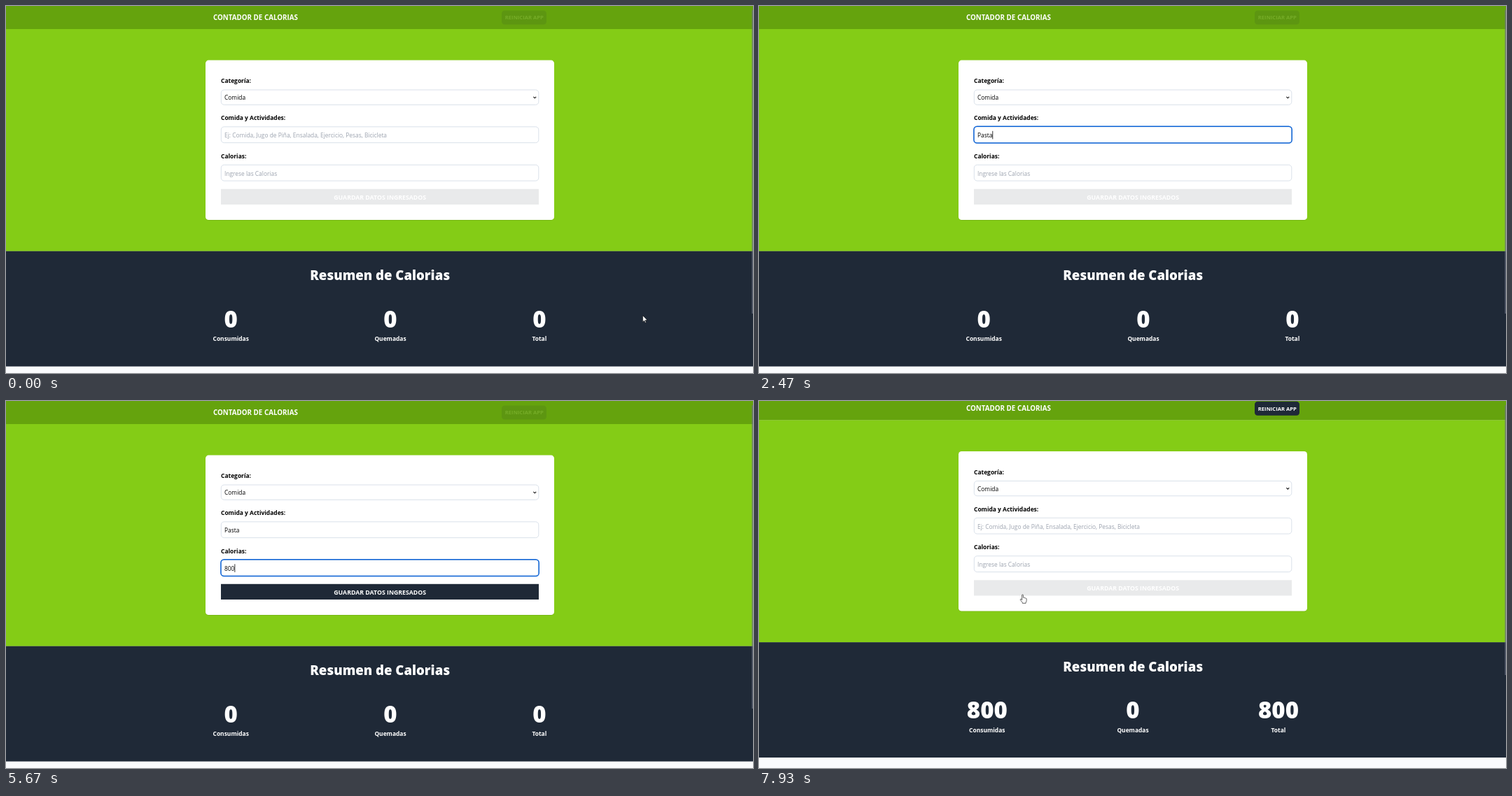
Recreate the animation shown at these times as an HTML page. Size 1067 px wide and 525 px high, loop 8000 ms.

```html
<!DOCTYPE html>
<html lang="es">
<head>
<meta charset="utf-8">
<title>Contador de calorias</title>
<style>
html, body { margin: 0; width: 100%; height: 100%; overflow: hidden; background: #fafbfd; }
svg { display: block; width: 1067px; height: 525px; }
text { font-family: "Open Sans", "Noto Sans", sans-serif; font-size: 8.4px; white-space: pre; }
.b { font-weight: 700; font-size: 8.45px; }
.w { fill: #fff; }
.mid { text-anchor: middle; }
.ph { fill: #9ca3af; }
.field { fill: #fff; stroke: #cbd5e1; stroke-width: .7; }
.ring { fill: none; stroke: #0b62d6; stroke-width: 1.5; }
.num { font-weight: 800; font-size: 33px; }
.menu text { font-size: 6.2px; fill: #f4f4f8; }
.caret { fill: #000; }
.ptr { stroke-linejoin: round; stroke-linecap: round; }
</style>
</head>
<body>
<svg viewBox="0 0 1067 525">
  <rect width="1067" height="525" fill="#fafbfd"/>
  <g id="page">
    <rect width="1067" height="33.2" fill="#65a30d"/>
    <text class="b w" x="296" y="20" style="font-size:9.8px">CONTADOR DE CALORIAS</text>
    <g id="reset">
      <rect x="708" y="6.4" width="64" height="20" rx="4.2" fill="#1f2937"/>
      <text class="b w mid" x="740.3" y="19.3" style="font-size:7.62px">REINICIAR APP</text>
    </g>

    <rect y="33" width="1067" height="317.8" fill="#84cc16"/>
    <rect x="285" y="78.3" width="498" height="228.6" rx="4.6" fill="#000" opacity=".1"/>
    <rect x="285" y="77.6" width="498" height="228.5" rx="4.4" fill="#fff"/>

    <text class="b" x="307" y="110.2">Categoría:</text>
    <rect class="field" x="307.3" y="120" width="453.5" height="21.3" rx="4.2"/>
    <text x="312" y="134.2">Comida</text>
    <path d="M753.4 129.8l1.9 2 1.9-2" fill="none" stroke="#111" stroke-width="1.1"/>

    <text class="b" x="307" y="163.1">Comida y Actividades:</text>
    <g id="food"></g>
    <text class="b" x="307" y="217.6">Calorias:</text>
    <g id="kcal"></g>

    <g id="save">
      <rect x="307" y="261.8" width="454" height="22.2"/>
      <text class="b w mid" x="534.2" y="276.6" style="font-size:8.76px">GUARDAR DATOS INGRESADOS</text>
    </g>

    <g class="menu" id="menu">
      <rect x="307.2" y="196.2" width="453.6" height="45" fill="#2b2a33" stroke="#4a4953" stroke-width=".5"/>
      <text x="310.4" y="205.2">pichi</text>
      <text x="310.4" y="216.3">Pesas</text>
      <text x="310.4" y="227.4">pesas</text>
      <text x="310.4" y="238.5">Piña</text>
    </g>

    <rect y="350.7" width="1067" height="164.9" fill="#1f2937"/>
    <text class="w mid" x="534.2" y="392.4" style="font-weight:800;font-size:18.6px">Resumen de Calorias</text>
    <g id="stats"></g>
  </g>
  <rect id="thumb" x="1065.4" width="1.6" fill="#6b7280" opacity=".75"/>

  <g id="pointer" class="ptr">
    <path data-kind="arrow" d="M0 0v9l2.1-1.9 1.4 3.1 1.3-.6-1.4-3h2.9z" fill="#fff" stroke="#111" stroke-width=".6"/>
    <path data-kind="beam" d="M-1.9-4.8h1.2l.7.6.7-.6h1.2M0-4.2v8.4M-1.9 4.8h1.2l.7-.6.7.6h1.2" fill="none" stroke="#222" stroke-width=".8"/>
    <path data-kind="hand" d="M-.9 7V.8Q-.8 0 0 0t.9.8V4.2q1.4-.6 1.7.5 1.3-.5 1.6.5 1.3-.2 1.4.9V8.6q0 1.4-1 2.5v1.2H-.2v-1L-3 7.8q-.7-1 .1-1.5.8-.3 2 .9z" fill="#fff" stroke="#111" stroke-width=".65"/>
  </g>
</svg>
<script>
const $ = id => document.getElementById(id);
const show = (el, on) => el.setAttribute('visibility', on ? 'inherit' : 'hidden');
const LOOP = 8000, STEPS = 120, LEFT = 312;

function makeField(id, y, hint) {
  const g = $(id);
  g.innerHTML = `
    <rect class="field" x="307.3" y="${y}" width="453.5" height="22.8" rx="4.2"/>
    <text class="ph" x="${LEFT}" y="${y + 15.4}">${hint}</text>
    <text x="${LEFT}" y="${y + 15.4}"></text>
    <rect class="ring" x="306.9" y="${y - .5}" width="454.3" height="23.8" rx="4.6"/>
    <rect class="caret" y="${y + 6}" width=".8" height="11.6"/>`;
  const [, ph, value, ring, caret] = g.children;
  return (text, focused, blink) => {
    value.textContent = text;
    show(ph, !text);
    show(ring, focused);
    show(caret, focused && blink);
    caret.setAttribute('x', LEFT + .1 + (text ? value.getComputedTextLength() : 0));
  };
}
const food = makeField('food', 172.8, 'Ej: Comida, Jugo de Piña, Ensalada, Ejercicio, Pesas, Bicicleta');
const kcal = makeField('kcal', 227.3, 'Ingrese las Calorias');

const stats = ['Consumidas', 'Quemadas', 'Total'].map(name => {
  const g = document.createElementNS('http://www.w3.org/2000/svg', 'g');
  g.innerHTML = `<text class="num w mid" y="459.6">0</text><text class="b w mid" y="479.2">${name}</text>`;
  $('stats').append(g);
  return g;
});

// Typed characters appear at these steps
const typed = (word, steps, n) => word.slice(0, steps.filter(s => n >= s).length);
// Caret toggles every 8 steps after it was last reset
const blinkFrom = (start, n) => Math.floor((n - start) / 8) % 2 === 0;

// step, x, y, shape from here on
const track = [
  [0, 909.6, 443, 'arrow'], [1, 900, 438, 'arrow'], [5, 640, 295, 'arrow'],
  [9, 402, 202, 'arrow'], [10, 384, 189, 'beam'], [11, 378, 185, 'beam'],
  [24, 378, 185, ''], [40, 378, 186, 'beam'], [42, 378, 200, 'arrow'],
  [45, 378, 232, 'beam'], [47, 378, 240.5, 'beam'], [50, 378, 241.2, 'beam'],
  [79, 378, 241.2, ''], [88, 378, 241.2, 'beam'], [91, 377, 243, 'beam'],
  [96, 376, 247, 'beam'], [97, 375, 254, 'arrow'], [98, 373, 265, 'hand'],
  [100, 370.5, 280, 'hand'], [101, 369.3, 285.3, 'arrow'], [102, 369.3, 285.3, 'arrow'],
  [103, 370.5, 282, 'hand'], [106, 374, 273.4, 'hand'], [111, 374, 273.4, 'hand'],
  [114, 376.5, 277, 'hand'], [STEPS, 376.5, 277, 'hand']
];

function movePointer(n) {
  const i = track.findIndex(k => k[0] > n) - 1;
  const [s, x, y, kind] = track[i], [s2, x2, y2] = track[i + 1];
  const p = (n - s) / (s2 - s);
  $('pointer').setAttribute('transform', `translate(${x + (x2 - x) * p} ${y + (y2 - y) * p})`);
  for (const el of $('pointer').children) show(el, el.dataset.kind === kind);
}

function draw(ms) {
  // 15 steps per second, as in a screen recording
  const n = Math.floor((ms + 4) / LOOP * STEPS) % STEPS;
  const saved = n >= 108, scrolled = n >= 119;
  const ready = n >= 79 && !saved;

  food(saved ? '' : typed('Pasta', [24, 28, 30, 34, 37], n), n >= 12 && n < 47, n >= 24 || blinkFrom(12, n));
  kcal(saved ? '' : typed('800', [79, 83, 85], n), n >= 47 && n < 106, blinkFrom(n < 79 ? 47 : n < 83 ? 79 : 83, n));
  show($('menu'), n >= 25 && n < 30);

  const [bar, label] = $('save').children;
  bar.setAttribute('fill', !ready ? '#e9eaeb' : n >= 98 ? '#111827' : '#1f2937');
  label.setAttribute('opacity', 1);
  $('reset').setAttribute('opacity', saved ? 1 : .1);

  const xs = saved ? [325.8, 534, 742] : [321.2, 549, 761.8];
  stats.forEach((g, i) => {
    g.setAttribute('transform', `translate(${xs[i]} 0)`);
    g.firstChild.textContent = saved && i !== 1 ? '800' : '0';
  });

  $('page').setAttribute('transform', `translate(0 ${scrolled ? -5.56 : 0})`);
  $('thumb').setAttribute('y', 6);
  $('thumb').setAttribute('height', scrolled ? 386 : 434);
  movePointer(n);
}

const start = performance.now();
function tick() {
  draw((performance.now() - start) % LOOP);
  requestAnimationFrame(tick);
}
tick();
</script>
</body>
</html>
```
